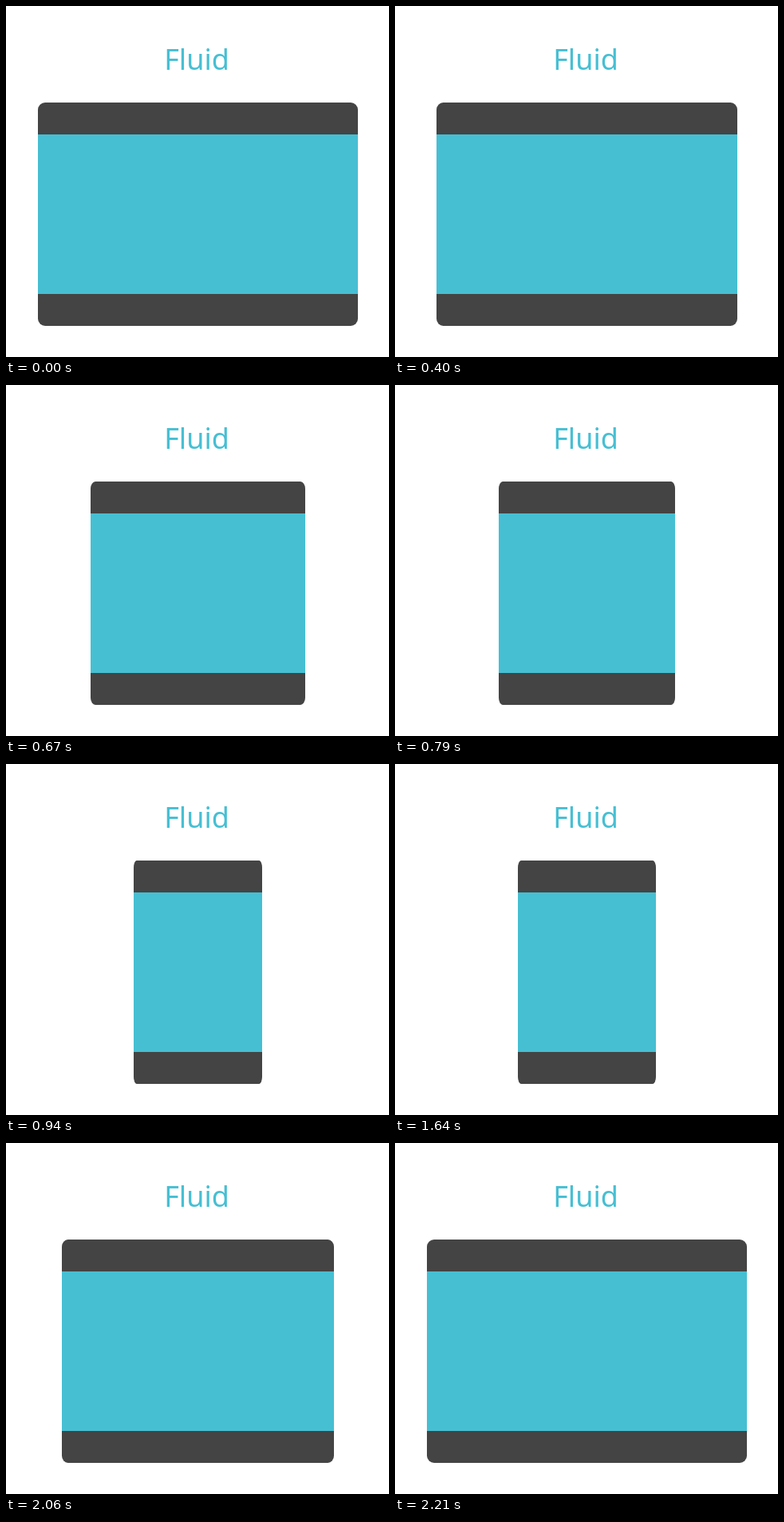
Recreate the animation shown at these times as an HTML page with a canvas. Size 480 px wide and 440 px high, loop 2540 ms.

```html
<!DOCTYPE html>
<html lang="en">
<head>
<meta charset="utf-8">
<title>Fluid</title>
<style>
  html, body { margin: 0; width: 100%; height: 100%; overflow: hidden; background: #fff; }
  canvas { display: block; }
</style>
</head>
<body>
<canvas id="stage" width="480" height="440"></canvas>
<script>
const ctx = document.getElementById('stage').getContext('2d');
const LOOP = 2540, TICK = 30, STEPS = 20, STRIDE = 6;
const SHRINK_AT = 370, GROW_AT = 1640;
const LEFT = 40, TOP = 121, WIDTH = 401, HEIGHT = 280, BAR = 40, RADIUS = 9;
const BLUE = '#46bfd3', DARK = '#444';

// Number of ticks taken since a phase began, the first at its start.
function stepsSince(t, start) {
  return Math.max(0, Math.min(STEPS, Math.floor((t - start) / TICK) + 1));
}

// The corners narrow together with the box.
function roundedBox(x, w) {
  const rx = RADIUS * w / WIDTH;
  ctx.beginPath();
  ctx.roundRect(x, TOP, w, HEIGHT, { x: rx, y: RADIUS });
  ctx.fill();
}

function draw(t) {
  const inset = STRIDE * (stepsSince(t, SHRINK_AT) - stepsSince(t, GROW_AT));
  const x = LEFT + inset, w = WIDTH - 2 * inset;

  ctx.fillStyle = '#fff';
  ctx.fillRect(0, 0, 480, 440);

  ctx.fillStyle = BLUE;
  ctx.font = '36px "Noto Sans", "Open Sans", sans-serif';
  ctx.textAlign = 'center';
  ctx.fillText('Fluid', 239, 80);

  ctx.fillStyle = DARK;
  roundedBox(x, w);
  ctx.fillStyle = BLUE;
  ctx.fillRect(x, TOP + BAR, w, HEIGHT - 2 * BAR);
}

const began = performance.now();
function frame() {
  draw((performance.now() - began) % LOOP);
  requestAnimationFrame(frame);
}
frame();
</script>
</body>
</html>
```
